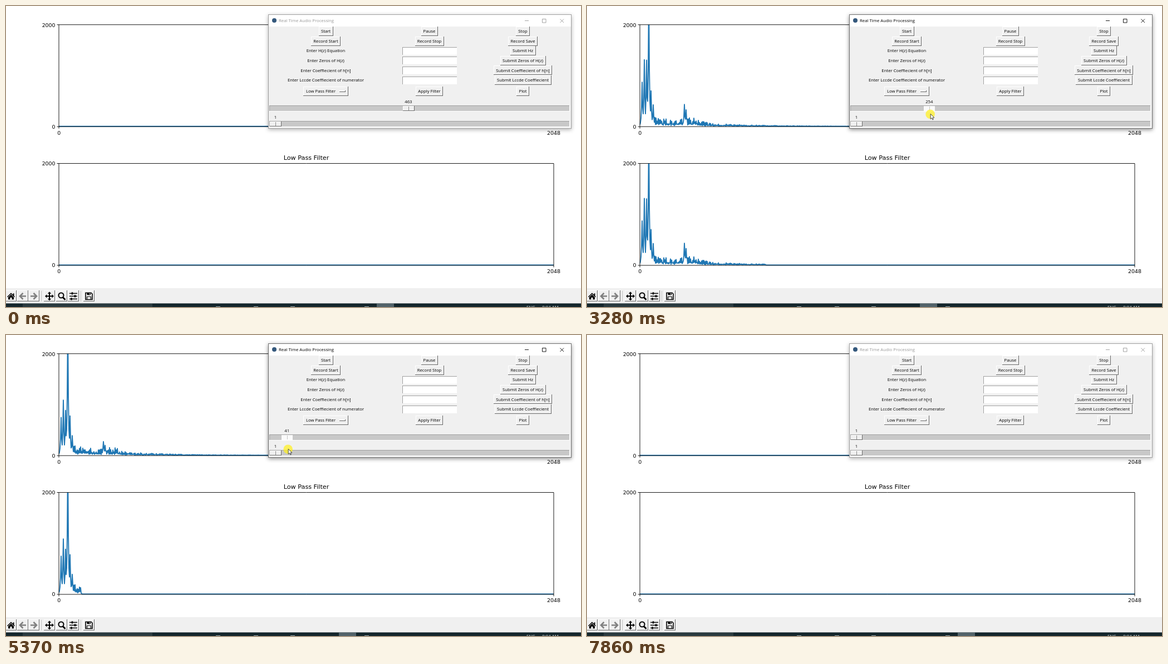
An HTML page with a canvas for the animation above (7960 ms loop, 1033 px wide and 542 px high).

```html
<!DOCTYPE html>
<html lang="en">
<head>
<meta charset="utf-8">
<title>Real Time Audio Processing</title>
<style>
html, body { margin: 0; width: 100%; height: 100%; overflow: hidden; background: #fff; }
canvas { display: block; }
</style>
</head>
<body>
<canvas id="stage" width="1033" height="542"></canvas>
<script>
const ctx = document.getElementById('stage').getContext('2d');
const LOOP = 7960, STEP = 77.9;
const UI = '"Open Sans", sans-serif', PLOT = '"DejaVu Sans", sans-serif';
const BLUE = '#1f77b4', FACE = '#f0f0f0';

const GRAB = 27, RELEASE = 82, BLUR = 99;
const drag = [[GRAB, 463], [32, 401], [43, 239], [53, 152], [65, 84], [69, 41], [76, 1]];
// Spectral lines: x, height when loud, height when settled.
const partials = [[99, 92, 70], [103, 167, 88], [107, 172, 82], [111, 250, 235], [115, 45, 80],
  [119, 35, 38], [175, 56, 24], [178, 52, 16]];

const clamp = v => Math.max(0, Math.min(1, v));
const mix = (a, b, t) => a + (b - a) * t;
const ramp = (from, to, t) => clamp((t - from) / (to - from));
const smooth = (from, to, t) => { const u = ramp(from, to, t); return u * u * (3 - 2 * u); };
const random = n => { const v = Math.sin(n * 12.9898 + 4.1) * 43758.5453; return v - Math.floor(v); };

function sliderValue(step) {
  const i = drag.findIndex(([t]) => t > step);
  if (i === 0) return drag[0][1];
  if (i < 0) return 1;
  const [t0, v0] = drag[i - 1], [t1, v1] = drag[i];
  return mix(v0, v1, ramp(t0, t1, step));
}

const sliderX = value => 484 + (value - 1) * .517;

function cursorAt(step) {
  if (step < GRAB) {
    const t = smooth(0, 10, step);
    return [mix(1018, 729, t), mix(550, 181, t)];
  }
  const leave = smooth(RELEASE, 87, step), y = 181.5 + 26 * ramp(GRAB, 76, step) ** .6;
  return [mix(sliderX(sliderValue(step)) + 2, 1012, leave), mix(y, 536, leave) + 20 * ramp(98, 100, step)];
}

function rect(x, y, w, h, color) {
  ctx.fillStyle = color;
  ctx.fillRect(x, y, w, h);
}

function text(str, x, y, { size = 7.75, align = 'center', color = '#000', font = UI } = {}) {
  ctx.font = `${size}px ${font}`;
  ctx.textAlign = align;
  ctx.fillStyle = color;
  ctx.fillText(str, x, y + size * .36);
}

function stroke(path, color = '#000', width = 1) {
  ctx.strokeStyle = color;
  ctx.lineWidth = width;
  ctx.stroke(new Path2D(path));
}

function fill(path, color = '#000') {
  ctx.fillStyle = color;
  ctx.fill(new Path2D(path));
}

function disc(x, y, r, color) {
  ctx.fillStyle = color;
  ctx.beginPath();
  ctx.arc(x, y, r, 0, 7);
  ctx.fill();
}

function raised(x, y, w, h) {
  rect(x, y, w, h, '#696969');
  rect(x, y, w - 1, h - 1, '#fff');
  rect(x + 1, y + 1, w - 2, h - 2, FACE);
}

function spectrum(step) {
  const level = smooth(10, 15, step) * (1 - smooth(80, 95, step));
  const settle = 1 - (1 - ramp(19, 80, step)) ** 2;
  const points = [];
  for (let x = 95; x < 500; x++) {
    const r = random(x + step * 57);
    const envelope = (18 * Math.exp((120 - x) / 90) + 8 * Math.exp(-(((x - 188) / 18) ** 2))) * clamp((x - 85) / 30);
    const noise = envelope * (x % 2 ? .1 + .25 * r : .25 + .75 * r);
    const line = Math.max(...partials.map(([px, loud, settled]) =>
      mix(loud, settled, settle) * (.9 + .2 * random(px + step)) * Math.exp(-Math.abs(x - px) / 1.2)));
    points.push([x, level * Math.max(line, noise)]);
  }
  points.push([984, 0]);
  return points;
}

function plot(top, points, gain) {
  const bottom = top + 183.5;
  ctx.save();
  ctx.beginPath();
  ctx.rect(95, top, 889, 184);
  ctx.clip();
  ctx.beginPath();
  for (const [x, h] of points) ctx.lineTo(x, bottom - .5 - h * gain(x));
  ctx.strokeStyle = BLUE;
  ctx.lineWidth = 1.9;
  ctx.lineJoin = 'round';
  ctx.stroke();
  ctx.restore();
  stroke(`M95 ${top}H984V${bottom}H95ZM91.5 ${top}H95M91.5 ${bottom}H95M95 ${bottom}v3.5M984 ${bottom}v3.5`, '#000', .9);
  const label = { size: 9.4, font: PLOT };
  text('2000', 88.5, top + .5, { ...label, align: 'right' });
  text('0', 88.5, bottom, { ...label, align: 'right' });
  text('0', 95.3, bottom + 11, label);
  text('2048', 984, bottom + 11, label);
}

const arrow = 'M6 0H-4.5M.5 -5.5L-5 0L.5 5.5';
const tools = [
  [-1, () => { fill('M-7 1L0 -6L7 1L6 2L0 -4L-6 2ZM3.5 -5H5.5V0L3.5 -2Z'); fill('M-5 2L0 -3L5 2V6H1.5V2.5H-1.5V6H-5Z'); }],
  [20, () => stroke(arrow, '#808080', 2.6)],
  [40, () => { ctx.scale(-1, 1); stroke(arrow, '#808080', 2.6); }],
  [68, () => {
    stroke('M-6 0H6M0 -6V6', '#000', 2);
    fill('M-8 0l3.5 -3.2v6.4ZM8 0l-3.5 -3.2v6.4ZM0 -8l-3.2 3.5h6.4ZM0 8l-3.2 -3.5h6.4Z');
  }],
  [90, () => { stroke('M3.5 -1.5a4.5 4.5 0 1 1 -9 0a4.5 4.5 0 1 1 9 0', '#000', 2); stroke('M2 2L6.5 6.5', '#000', 2.8); }],
  [111, () => { stroke('M-7 -5H7M-7 0H7M-7 5H7', '#000', 1.5); stroke('M-2 -7v4M3 -2v4M-3.5 3v4', '#000', 2.6); }],
  [139, () => {
    stroke('M-6 -6H4L6 -4V6H-6Z', '#000', 1.6);
    fill('M-3.5 -6H3V-2H-3.5Z');
    rect(.5, -5, 1.5, 2, FACE);
    stroke('M-3.5 6V1H3.5V6', '#000', 1.2);
  }]];

function toolbar() {
  rect(0, 508, 1033, 28, FACE);
  for (const x of [63, 134]) rect(x, 513, 1, 19, '#c4c4c4');
  for (const [x, icon] of tools) {
    raised(x, 512, 20, 20);
    ctx.save();
    ctx.translate(x + 10, 522.5);
    icon();
    ctx.restore();
  }
}

function taskbar(focused) {
  rect(0, 535.5, 1033, 7, '#14262c');
  rect(30, 536, 233, 6, '#2a3a3f');
  rect(focused ? 598 : 666, 536, 31, 6, '#52636a');
  for (const x of [377, 445, 511, 644]) rect(x, 541, 8, 1, '#a4b0b3');
  text('ENG', 943, 542.5, { color: '#e6eaea' });
  text('9:04 AM', 978, 542.5, { color: '#e6eaea' });
}

const columns = [
  { x: 574.5, buttons: ['Start', 'Record Start'] },
  { x: 760.5, buttons: ['Pause', 'Record Stop', , , , , 'Apply Filter'] },
  { x: 928.5, buttons: ['Stop', 'Record Save', 'Submit Hz', 'Submit Zeros of H(z)',
    'Submit Coeffiecient of h[n]', 'Submit Lccde Coeffiecient', 'Plot'] }];
const fields = ['Enter H(z) Equation', 'Enter Zeros of H(z)', 'Enter Coeffiecient of h[n]', 'Enter Lccde Coeffiecient of numerator'];
const rowY = i => i < 6 ? 45.5 + 17.6 * i : 153;

function button(label, x, y) {
  ctx.font = `7.75px ${UI}`;
  const w = Math.round(ctx.measureText(label).width + 8.5);
  raised(Math.round(x - w / 2), Math.round(y - 8.5), w, 17);
  text(label, x, y);
}

function slider(y, value, active) {
  const x = sliderX(value), left = Math.round(x - 10);
  text(value, x, y - 12);
  rect(473, y - 5, 540, 11, '#fff');
  rect(473, y - 5, 539, 10, '#a0a0a0');
  rect(474, y - 4, 538, 9, '#c8c8c8');
  if (active) rect(left, y - 4, 20, 9, '#fafafa');
  else raised(left, y - 4, 21, 9);
  rect(left + 10, y - 3, 1, 7, active ? '#c4c4c4' : '#8a8a8a');
}

function panel(value, focused, pressed) {
  ctx.save();
  ctx.shadowColor = focused ? 'rgba(0,0,0,.45)' : 'rgba(0,0,0,.3)';
  ctx.shadowBlur = 7;
  ctx.shadowOffsetY = 2;
  rect(471, 15, 545, 206, focused ? '#707070' : '#a0a0a0');
  ctx.restore();
  rect(472, 16, 543, 204, FACE);
  rect(472, 16, 543, 21, '#fff');
  const ink = focused ? '#000' : '#999';
  disc(482, 26, 4, '#34587c');
  text('Real Time Audio Processing', 490, 26.5, { align: 'left', color: ink });
  stroke('M932 26.5H939M963.5 23.5h6.5v6.5h-6.5ZM995.5 23.5l6.5 6.5M1002 23.5l-6.5 6.5', ink, .9);

  for (const { x, buttons } of columns) buttons.forEach((label, row) => button(label, x, rowY(row)));
  fields.forEach((label, i) => {
    const y = rowY(i + 2), top = Math.round(y - 7);
    text(label, 574.5, y);
    rect(712, top, 98, 14, '#a0a0a0');
    rect(713, top + 1, 97, 13, '#fff');
  });
  raised(534, 145, 81, 17);
  text('Low Pass Filter', 565.5, 153.2);
  raised(599, 152, 11, 3);
  slider(184, value, pressed);
  slider(212, 1, false);
}

function cursor([x, y], pressed) {
  if (pressed) disc(x, y + .5, 8.3, 'rgba(255,240,30,.72)');
  ctx.save();
  ctx.translate(x, y);
  const shape = 'M.5 0V9.3L2.7 7.3L4.2 10.6L5.6 10L4.2 6.8H7.2Z';
  fill(shape, '#fff');
  stroke(shape, '#222', .8);
  ctx.restore();
}

function draw(now) {
  const step = Math.floor((now % LOOP + 25) / STEP);
  const focused = step >= GRAB && step < BLUR, pressed = step >= GRAB && step < RELEASE;
  const cutoff = 95 + .868 * sliderValue(step - .5);
  const points = spectrum(step);
  rect(0, 0, 1033, 542, '#fff');
  plot(33.7, points, () => 1);
  plot(283.5, points, x => clamp((cutoff + 1 - x) / 3));
  text('Low Pass Filter', 539.5, 273, { size: 11.2, font: PLOT });
  toolbar();
  taskbar(focused);
  panel(Math.round(sliderValue(step)), focused, pressed);
  cursor(cursorAt(step), pressed);
  requestAnimationFrame(() => draw(performance.now()));
}
draw(0);
</script>
</body>
</html>
```
